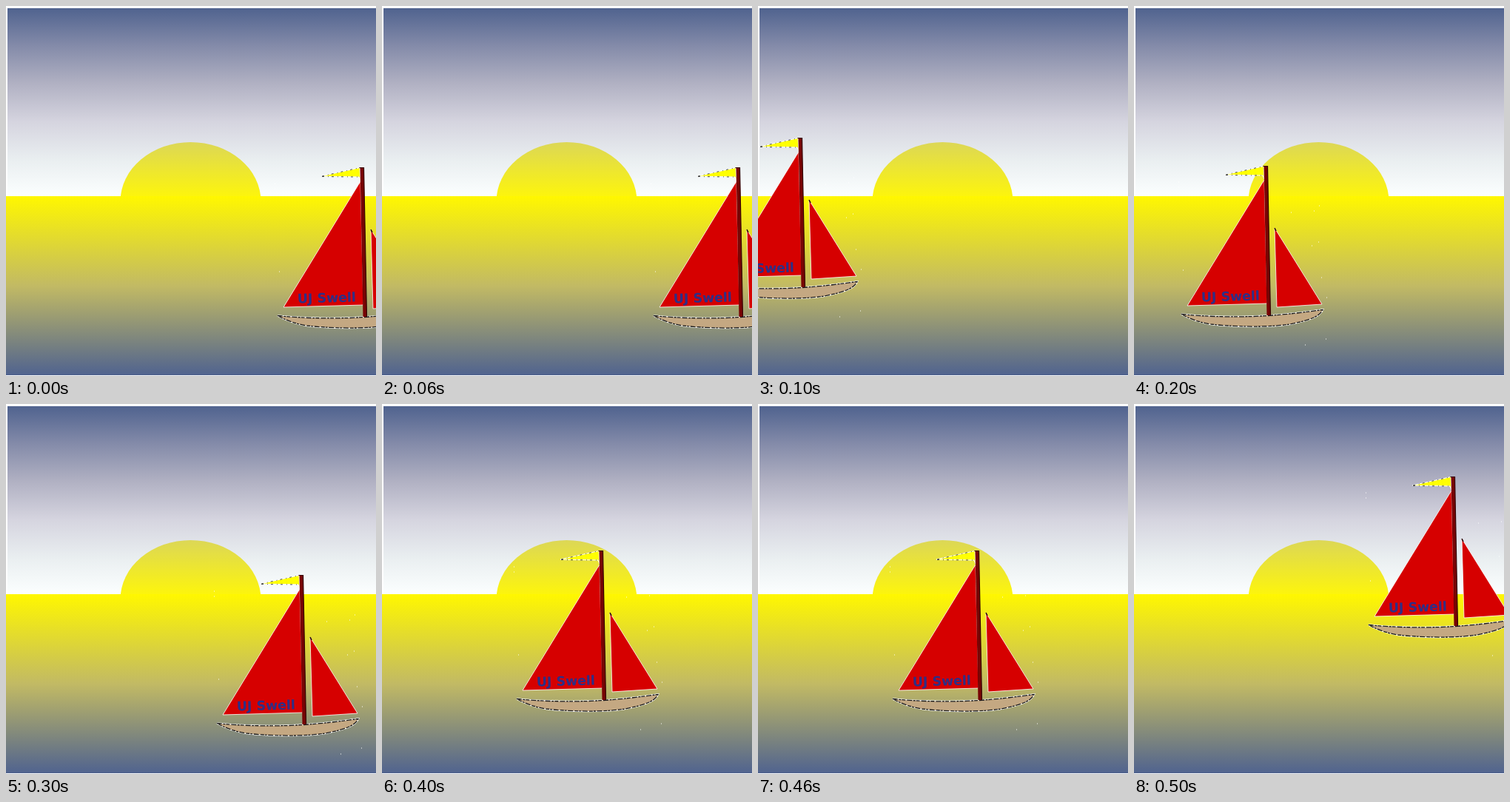
An HTML page that plays this animation: 500x500 px, repeating every 0.6 s.

```html
<!DOCTYPE html>
<html lang="en">
<head>
<meta charset="utf-8">
<title>Sailing boat at sunset</title>
<style>
  html, body { margin: 0; width: 100%; height: 100%; overflow: hidden; background: #fff; }
  svg { display: block; width: 100%; height: 100%; }
  .boat { animation: jump 600ms step-end infinite; }
  .name { font: bold 17.4px "DejaVu Sans", Verdana, sans-serif; fill: #2c2f88; }
  .sail { fill: #d60000; stroke: #fff; stroke-width: 1; stroke-opacity: .8; }
  @keyframes jump {
    0%       { transform: translate(303px, 2px); }
    16.6667% { transform: translate(-121px, -38px); }
    33.3333% { transform: translate(0, 0); }
    50%      { transform: translate(221px, 15px); }
    66.6667% { transform: translate(118px, -18px); }
    83.3333% { transform: translate(253px, -118px); }
    100%     { transform: translate(303px, 2px); }
  }
</style>
</head>
<body>
<svg viewBox="0 0 500 500">
  <defs>
    <linearGradient id="sky" x2="0" y2="1">
      <stop offset="0" stop-color="#50638f"/>
      <stop offset=".2" stop-color="#848ba9"/>
      <stop offset=".4" stop-color="#b1b1c3"/>
      <stop offset=".6" stop-color="#d5d4df"/>
      <stop offset=".8" stop-color="#e9eef0"/>
      <stop offset="1" stop-color="#fcffff"/>
    </linearGradient>
    <linearGradient id="sea" x2="0" y2="1">
      <stop offset="0" stop-color="#fff700"/>
      <stop offset=".5" stop-color="#c2ba64"/>
      <stop offset="1" stop-color="#50638f"/>
    </linearGradient>
    <linearGradient id="sun" gradientUnits="userSpaceOnUse" x1="0" y1="184" x2="0" y2="258">
      <stop offset="0" stop-color="#dcd756"/>
      <stop offset="1" stop-color="#fdf50c"/>
    </linearGradient>
  </defs>

  <rect x="2" y="3" width="498" height="255" fill="url(#sky)"/>
  <ellipse cx="249.5" cy="264" rx="95" ry="80" fill="url(#sun)"/>
  <rect y="257" width="500" height="242" fill="url(#sea)"/>

  <g class="boat">
    <path d="M60 238h1M60 245h1M250 270h1M212 279h1M243 277h1M66 357h1M249 319h1M240 324h1M253 367h1M260 394h1M259 450h1M231 458h1"
          stroke="#fff" stroke-width="1.2"/>

    <path class="sail" d="M176 235L180 402L72 405Z"/>
    <path class="sail" d="M190 300L254 403L193 407Z"/>
    <path d="M190 300l2 4" stroke="#200" stroke-width="1.5"/>

    <path d="M123 228L175 216.5L176 234L174 229Z" fill="#ff0" stroke="#fff"/>
    <path d="M124 228L175 216.5M124 228.5L174 229" fill="none" stroke="#222" stroke-width=".8" stroke-dasharray="3 5 1 4"/>

    <path d="M64 416.5C95 420 145 421 181 418.5S235 413 255 410.5C251 420 236 425 210 430C180 435 130 433 104 430C86 427 74 422 64 416.5Z"
          fill="#c4a882" stroke="#fff" stroke-width="2.4"/>
    <path d="M64 416.5C95 420 145 421 181 418.5S235 413 255 410.5C251 420 236 425 210 430C180 435 130 433 104 430C86 427 74 422 64 416.5Z"
          fill="#c4a882" stroke="#1a1a1a" stroke-width="1.3" stroke-dasharray="7 1.5 3 1 5 2"/>

    <path d="M175.500 216.500H180.500L184.500 418H179.500Z" fill="#780404"/>
    <path d="M174.500 216.500H180.500L184.500 418" fill="none" stroke="#300" stroke-width="1.2"/>

    <text class="name" transform="translate(91 399.500) rotate(-1.500)">UJ Swell</text>
  </g>
</svg>
</body>
</html>
```
